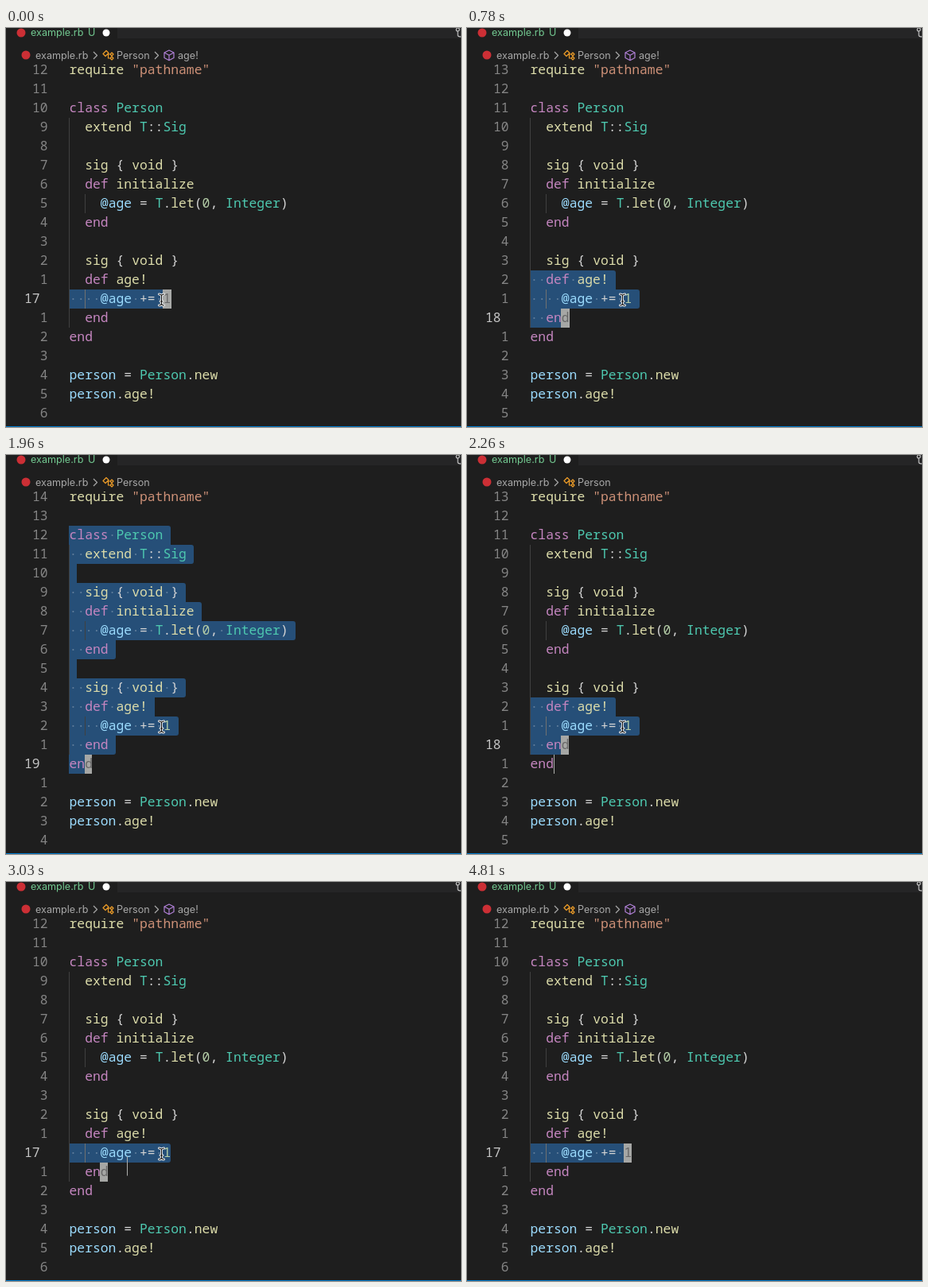
Animation of 572x502 px, one loop 4.87 s. Source, as an HTML page:

```html
<!DOCTYPE html>
<html lang="en">
<head>
<meta charset="utf-8">
<title>Expanding selection</title>
<style>
  html, body { margin: 0; width: 100%; height: 100%; overflow: hidden; background: #1e1e1e; }
  svg { display: block; width: 572px; height: 502px; }
  text { white-space: pre; }
  .code text { font: 16.38px "Noto Sans Mono", "DejaVu Sans Mono", monospace; }
  .ui text { font: 12.6px Inter, "Open Sans", sans-serif; fill: #a9a9a9; }
  .ui .git { fill: #73c991; }
  .icon { fill: none; stroke-width: 1.2; stroke-linejoin: round; }
  .kw { fill: #c586c0; }
  .type { fill: #4ec9b0; }
  .var { fill: #9cdcfe; }
  .num { fill: #b5cea8; }
  .str { fill: #ce9178; }
  .fn { fill: #dcdcaa; }
  .op { fill: #d4d4d4; }
  .line { fill: #858585; }
  .current { fill: #c6c6c6; }
  .sel { fill: #264f78; }
  .dot { fill: #fff; fill-opacity: .27; }
  .guide { fill: #404040; }
  .active { fill: #707070; }
  .ibeam { fill: none; stroke-linecap: round; }
</style>
</head>
<body>
<svg viewBox="0 0 572 502">
  <defs>
    <path id="beam" d="M-3-7q3 0 3 2.500v9q0 2.500-3 2.500M3-7q-3 0-3 2.500v9q0 2.500 3 2.500M-1.500 2h3"/>
  </defs>
  <rect width="572" height="502" fill="#1e1e1e"/>
  <g class="code" id="code"></g>

  <g class="ui">
    <rect width="572" height="46" fill="#1e1e1e"/>
    <rect x="140" width="432" height="13" fill="#252526"/>
    <circle cx="19" cy="6" r="5.5" fill="#cc2f35"/>
    <text class="git" x="31" y="10">example.rb</text>
    <text class="git" x="103" y="10">U</text>
    <circle cx="126" cy="6" r="4.5" fill="#fff"/>
    <g class="icon" stroke="#c5c5c5">
      <circle cx="568" cy="2" r="2"/>
      <path d="M568 4v5q0 2 4 2"/>
    </g>

    <circle cx="25" cy="34" r="5.5" fill="#cc2f35"/>
    <text x="37" y="38.5">example.rb</text>
    <path class="icon" stroke="#a9a9a9" d="M110 30l4.500 4.500-4.500 4.500"/>
    <path class="icon" stroke="#ee9d28"
      d="M122 32.500l4-4 3 3-4 4zM127 33h4M128.500 33v5h2.500M131 33l2-2 2 2-2 2zM131 38l2-2 2 2-2 2z"/>
    <text x="139" y="38.5">Person</text>
    <g id="method">
      <path class="icon" stroke="#a9a9a9" d="M187 30l4.500 4.500-4.500 4.500"/>
      <path class="icon" stroke="#b180d7"
        d="M205 28l6 3v6.500l-6 3.200-6-3.200v-6.500zM199 31l6 3.200 6-3.200M205 34.200v6.500"/>
      <text x="216" y="38.5">age!</text>
    </g>
  </g>

  <rect y="501" width="572" height="1" fill="#007acc"/>
  <g class="ibeam" id="mouse">
    <use href="#beam" stroke="#fff" stroke-width="2.8"/>
    <use href="#beam" stroke="#111" stroke-width="1.1"/>
  </g>
</svg>

<script>
const LOOP = 4870, LEFT = 79.5, CHAR = 9.83, ROW = 24, TOP = 41, BASE = 16.7;
const SOURCE = `require "pathname"

class Person
  extend T::Sig

  sig { void }
  def initialize
    @age = T.let(0, Integer)
  end

  sig { void }
  def age!
    @age += 1
  end
end

person = Person.new
person.age!
`.split("\n");

const TOKEN = /(?<str>"[^"]*")|(?<kw>\b(?:class|def|end)\b)|(?<type>[A-Z]\w*)|(?<var>@\w+|\bperson\b)|(?<num>\d+)|(?<fn>[a-z]\w*!?)|(?<op>[^\s\w"@]+)/g;

const $ = id => document.getElementById(id);
const colX = col => LEFT + col * CHAR;
const edgeX = col => Math.floor(colX(col));
const rowY = row => TOP + row * ROW;

function add(parent, tag, attrs = {}, text) {
  const el = document.createElementNS("http://www.w3.org/2000/svg", tag);
  for (const name in attrs) el.setAttribute(name, attrs[name]);
  if (text !== undefined) el.textContent = text;
  return parent.appendChild(el);
}

const code = $("code");

// Selected rows, with corners rounded where a neighbour is shorter
function addSelection({ from, to, start = 0 }) {
  const group = add(code, "g");
  const end = row => row < from || row > to ? 0
    : edgeX(SOURCE[row].length + (row < to ? 1 : 0));
  for (let row = from; row <= to; row++) {
    const first = row === from ? start : 0;
    const x = edgeX(first), y = rowY(row), r = end(row);
    const a = end(row - 1) < r ? 3 : 0, b = end(row + 1) < r ? 3 : 0;
    add(group, "path", {
      class: "sel",
      d: `M${x} ${y}H${r - a}q${a} 0 ${a} ${a}V${y + ROW - b}q0 ${b} ${-b} ${b}H${x}z`
    });
    [...SOURCE[row]].forEach((ch, col) => {
      if (ch === " " && col >= first)
        add(group, "circle", { class: "dot", cx: colX(col + .5), cy: y + 12, r: 1.1 });
    });
  }
  return group;
}

function addGutter(active) {
  const group = add(code, "g");
  SOURCE.forEach((_, row) => {
    const here = row === active;
    add(group, "text", {
      class: here ? "current" : "line",
      x: here ? 42.6 : 52.6, y: rowY(row) + BASE, "text-anchor": "end"
    }, here ? row + 5 : Math.abs(row - active));
  });
  return group;
}

function addBlock(row, col) {
  const group = add(code, "g"), x = edgeX(col);
  add(group, "rect", { x, y: rowY(row), width: edgeX(col + 1) - x, height: ROW, fill: "#a6a7a5" });
  add(group, "text", { x: colX(col), y: rowY(row) + BASE, fill: "#686868" }, SOURCE[row][col]);
  return group;
}

const selections = {
  body: addSelection({ from: 12, to: 12 }),
  inner: addSelection({ from: 11, to: 13, start: 2 }),
  method: addSelection({ from: 11, to: 13 }),
  class: addSelection({ from: 2, to: 14 })
};

const addGuide = (col, row, rows) =>
  add(code, "rect", { class: "guide", x: edgeX(col), y: rowY(row), width: 1, height: rows * ROW });
addGuide(0, 3, 11);
addGuide(2, 7, 1);
const bodyGuide = addGuide(2, 12, 1);

SOURCE.forEach((line, row) => {
  for (const m of line.matchAll(TOKEN)) {
    const kind = Object.keys(m.groups).find(k => m.groups[k]);
    add(code, "text", { class: kind, x: colX(m.index), y: rowY(row) + BASE }, m[0]);
  }
});

const gutters = { body: addGutter(12), method: addGutter(13), class: addGutter(14) };
const blocks = { body: addBlock(12, 12), method: addBlock(13, 4), class: addBlock(14, 2) };
const caret = add(code, "rect", { width: 1, height: ROW, fill: "#aeafad" });

// Each track is a list of [start time, value]
const selectionTrack = [[0, "body"], [300, "inner"], [780, "method"], [1200, "class"],
  [2260, "method"], [2670, "inner"], [3030, "body"]];
const blockTrack = [[0, "body"], [360, "method"], [1257, "class"], [2260, "method"], [3090, "body"]];
const spots = {
  body: [edgeX(13), rowY(12)],
  method: [edgeX(5), rowY(13)],
  class: [edgeX(3) + 1, rowY(14)]
};
const caretTrack = [
  [0, ["body", "body", 0]], [300, ["body", "method", .31]], [360, ["method", "method", 0]],
  [1257, ["method", "class", .6]], [1313, ["class", "class", 0]],
  [2317, ["class", "method", .6]], [2373, ["method", "method", 0]],
  [3030, ["method", "body", .31]], [3090, ["method", "body", .95]], [3150, ["body", "body", 0]]
];
const blinkTrack = [[0, 1], [1850, .66], [1905, .33], [1960, 0], [2260, 1],
  [3690, .66], [3750, .33], [3810, 0], [4190, .33], [4245, .66], [4300, 1],
  [4700, .66], [4755, .33], [4810, 0]];
const mouseTrack = [[0, [195.5, 342]], [4170, [188, 352]], [4228, [168, 384]],
  [4285, [226, 430]], [4342, [292, 458]], [4400, null]];

const at = (track, t) => track.findLast(([start]) => start <= t)[1];
const show = (el, on) => el.setAttribute("visibility", on ? "visible" : "hidden");
const showOnly = (set, key) => { for (const k in set) show(set[k], k === key); };

function draw(t) {
  const selected = at(selectionTrack, t);
  showOnly(selections, selected);
  showOnly(gutters, selected === "inner" ? "method" : selected);
  showOnly(blocks, at(blockTrack, t));
  bodyGuide.classList.toggle("active", selected !== "class");
  show($("method"), t < 1370 || t >= 2430);

  const [from, to, f] = at(caretTrack, t);
  const [x, y] = spots[from].map((v, i) => v + (spots[to][i] - v) * f);
  caret.setAttribute("x", Math.round(x));
  caret.setAttribute("y", y);
  caret.setAttribute("opacity", at(blinkTrack, t));

  const mouse = at(mouseTrack, t);
  show($("mouse"), mouse);
  if (mouse) $("mouse").setAttribute("transform", `translate(${mouse})`);
}

const begin = performance.now();
function tick() {
  draw((performance.now() - begin) % LOOP);
  requestAnimationFrame(tick);
}
tick();
</script>
</body>
</html>
```
